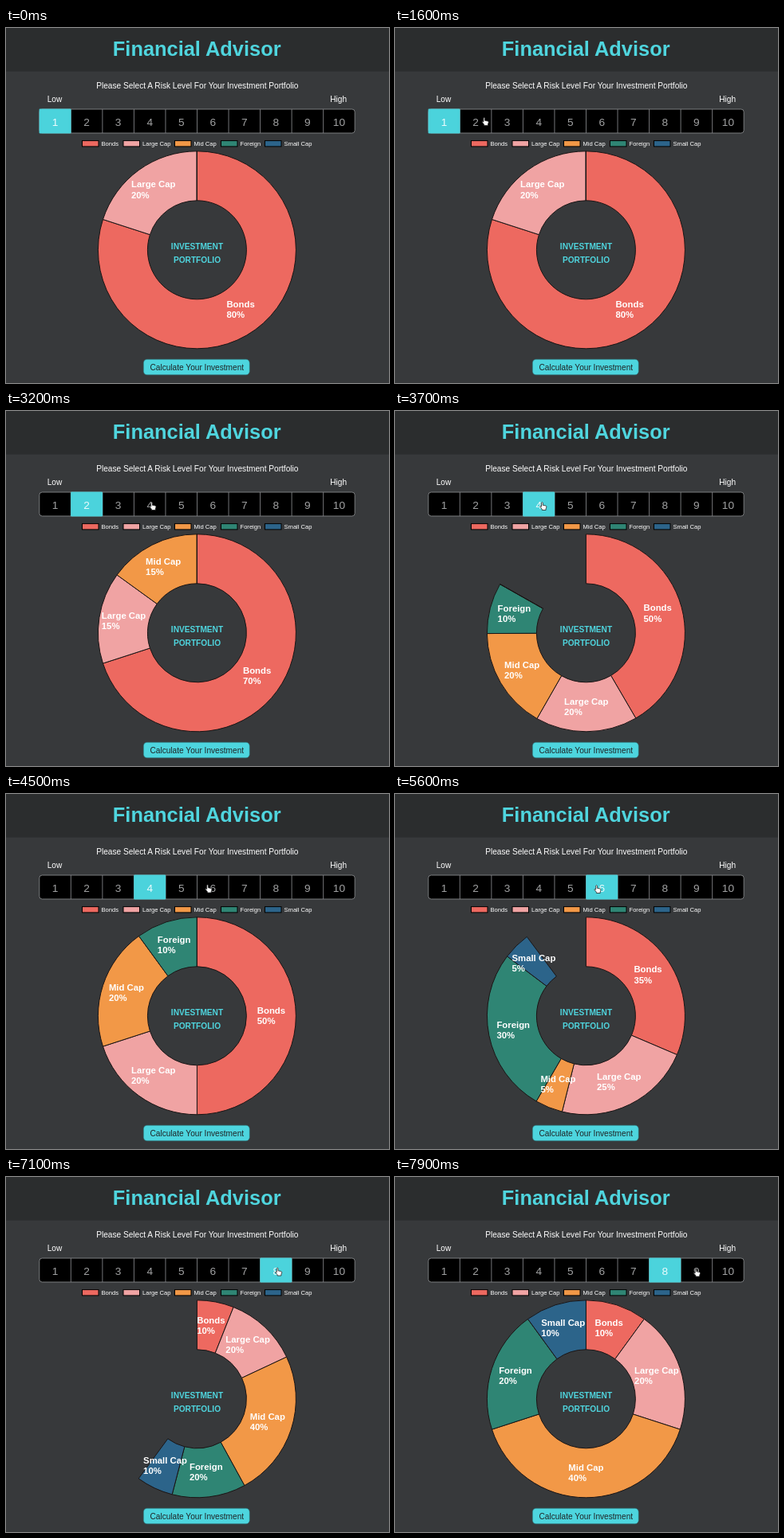
An HTML page that plays this animation: 480 by 446 pixels, repeating every 8000 ms.

```html
<!DOCTYPE html>
<html lang="en">
<head>
<meta charset="utf-8">
<title>Financial Advisor</title>
<style>
  html, body { margin: 0; width: 100%; height: 100%; overflow: hidden; background: #37393b; }
  svg { display: block; width: 480px; height: 446px; }
  text { font: 10.15px "Liberation Sans", Helvetica, Arial, sans-serif; fill: #fff; }
  .mid { text-anchor: middle; }
  .title { font-size: 25.4px; font-weight: bold; fill: #4fd5de; }
  .hub { font-weight: bold; fill: #4fd5de; }
  .legend { font-size: 7.6px; }
  .digit { font-size: 13.7px; fill: #a0a1a2; }
  .label { font-size: 11.35px; font-weight: bold; }
  .button { fill: #1f2426; }
</style>
</head>
<body>
<svg id="stage" viewBox="0 0 480 446">
  <rect width="480" height="446" fill="#37393b"/>
  <rect width="480" height="54.5" fill="#2b2d2e"/>
  <text class="title mid" x="239.2" y="35.3">Financial Advisor</text>
  <text class="mid" x="239.8" y="76">Please Select A Risk Level For Your Investment Portfolio</text>
  <text class="mid" x="61" y="93.4">Low</text>
  <text class="mid" x="416.7" y="93.4">High</text>
  <g id="levels"></g>
  <g id="legend"></g>
  <g id="ring" stroke="#1a1414" stroke-width="1" stroke-linejoin="round"></g>
  <g id="labels"></g>
  <text class="hub mid" x="239.5" y="277.8">INVESTMENT</text>
  <text class="hub mid" x="239.5" y="295.2">PORTFOLIO</text>
  <rect x="172.3" y="416.2" width="133" height="19.6" rx="4.5" fill="#4dd5de" stroke="#2b6a6f" stroke-width=".6"/>
  <text class="button mid" x="239.3" y="429.5">Calculate Your Investment</text>
  <path id="hand" fill="#fff" stroke="#222" stroke-width=".8" stroke-linejoin="round"
    d="M-2.3 .6V-4.2Q-1.4-5.6-.6-4.2V-1.2L3-.5Q4.2-.1 4 1.2L3.2 3.4V5H-1.6V3.8L-4.2 .6Q-3.9-.8-2.3 .6Z"/>
</svg>
<script>
const LOOP = 8000, STEP = 100, SWEEP = 1000;
const CX = 239.4, CY = 278.8, OUTER = 124, INNER = 62;
const CELL = { x: 41.8, y: 102, w: 39.54, h: 30 };

// name, colour, legend box x
const ASSETS = [
  ["Bonds", "#ed6960", 95.5],
  ["Large Cap", "#f0a3a3", 147],
  ["Mid Cap", "#f29847", 211.5],
  ["Foreign", "#2f8574", 269.5],
  ["Small Cap", "#2c648a", 324.5]
];

// click time, risk level, shares in percent
const CLICKS = [
  [-SWEEP, 1, [80, 20, 0, 0, 0]],
  [1824, 2, [70, 15, 15, 0, 0]],
  [3340, 4, [50, 20, 20, 10, 0]],
  [5165, 6, [35, 25, 5, 30, 5]],
  [6895, 8, [10, 20, 40, 20, 10]]
];

// time, x, y
const POINTER = [
  [0, -12, 170], [300, -12, 170], [900, 61, 121], [1500, 113, 117.5],
  [2300, 119, 117.5], [2500, 119, 117.5], [3150, 184, 119.5], [3800, 186, 119.5],
  [4400, 254, 119], [5700, 254, 119.5], [6500, 339, 119], [7250, 342, 119],
  [7900, 378.5, 120], [LOOP, 378.5, 120]
];

const $ = id => document.getElementById(id);

function add(parent, tag, attrs, text = "") {
  const el = document.createElementNS("http://www.w3.org/2000/svg", tag);
  set(el, attrs);
  el.textContent = text;
  return parent.appendChild(el);
}

function set(el, attrs) {
  for (const key in attrs) el.setAttribute(key, attrs[key]);
}

function buildLevels() {
  const { x, y, w, h } = CELL, g = $("levels");
  add(g, "rect", { x, y, width: 10 * w, height: h, rx: 3.5, fill: "#000", stroke: "#85878a", "stroke-width": .9 });
  for (let i = 1; i < 10; i++) {
    const lx = x + i * w;
    add(g, "line", { x1: lx, x2: lx, y1: y, y2: y + h, stroke: "#808285", "stroke-width": .9 });
  }
  const glow = add(g, "rect", { y: y - .4, width: w + .4, height: h + .8, rx: 1.2, fill: "#4bd3dc" });
  const digits = Array.from({ length: 10 }, (_, i) =>
    add(g, "text", { class: "digit mid", x: x + (i + .5) * w, y: 122.5 }, i + 1));
  return { glow, digits };
}

function buildAsset([name, fill, x]) {
  const legend = $("legend");
  add(legend, "rect", { x, y: 141.6, width: 20.5, height: 7.3, fill, stroke: "#000", "stroke-width": 1 });
  add(legend, "text", { class: "legend", x: x + 24, y: 147.8 }, name);
  const arc = add($("ring"), "path", { fill });
  const label = add($("labels"), "g", {});
  const title = add(label, "text", { class: "label", y: -3.2 }, name);
  const share = add(label, "text", { class: "label", y: 10 });
  const left = -title.getComputedTextLength() / 2;
  set(title, { x: left });
  set(share, { x: left });
  return { arc, label, share };
}

const levels = buildLevels();
const assets = ASSETS.map(buildAsset);

// Turns run clockwise from twelve o'clock
function polar(r, turn) {
  const a = turn * 2 * Math.PI;
  return [CX + r * Math.sin(a), CY - r * Math.cos(a)];
}

function slice(from, to) {
  const big = to - from > .5 ? 1 : 0;
  return `M${polar(OUTER, from)}A${OUTER} ${OUTER} 0 ${big} 1 ${polar(OUTER, to)}` +
    `L${polar(INNER, to)}A${INNER} ${INNER} 0 ${big} 0 ${polar(INNER, from)}Z`;
}

function drawRing(shares, progress) {
  let from = 0;
  assets.forEach(({ arc, label, share }, i) => {
    const to = from + shares[i] / 100 * progress;
    const [x, y] = polar((OUTER + INNER) / 2, (from + to) / 2);
    set(arc, { d: slice(from, to) });
    set(label, { transform: `translate(${x} ${y})`, visibility: shares[i] ? "visible" : "hidden" });
    share.textContent = shares[i] + "%";
    from = to;
  });
}

function drawLevel(level) {
  const { x, w } = CELL;
  set(levels.glow, { x: x + (level - 1) * w - .2 });
  levels.digits.forEach((d, i) => { d.style.fill = i + 1 === level ? "#e9fbfc" : ""; });
}

function drawPointer(t) {
  const i = POINTER.findIndex(p => p[0] > t);
  const [t0, x0, y0] = POINTER[i - 1], [t1, x1, y1] = POINTER[i];
  const u = (t - t0) / (t1 - t0), k = u * u * (3 - 2 * u);
  set($("hand"), { transform: `translate(${x0 + (x1 - x0) * k} ${y0 + (y1 - y0) * k})` });
}

function render(t) {
  const [start, level, shares] = CLICKS.filter(c => c[0] <= t).pop();
  const u = Math.min(1, (t - start) / SWEEP);
  drawLevel(level);
  drawRing(shares, 1 - (1 - u) ** 4);
  drawPointer(t);
}

const begin = performance.now();
function tick() {
  const t = (performance.now() - begin) % LOOP;
  render(Math.floor(t / STEP) * STEP);
  requestAnimationFrame(tick);
}
tick();
</script>
</body>
</html>
```
